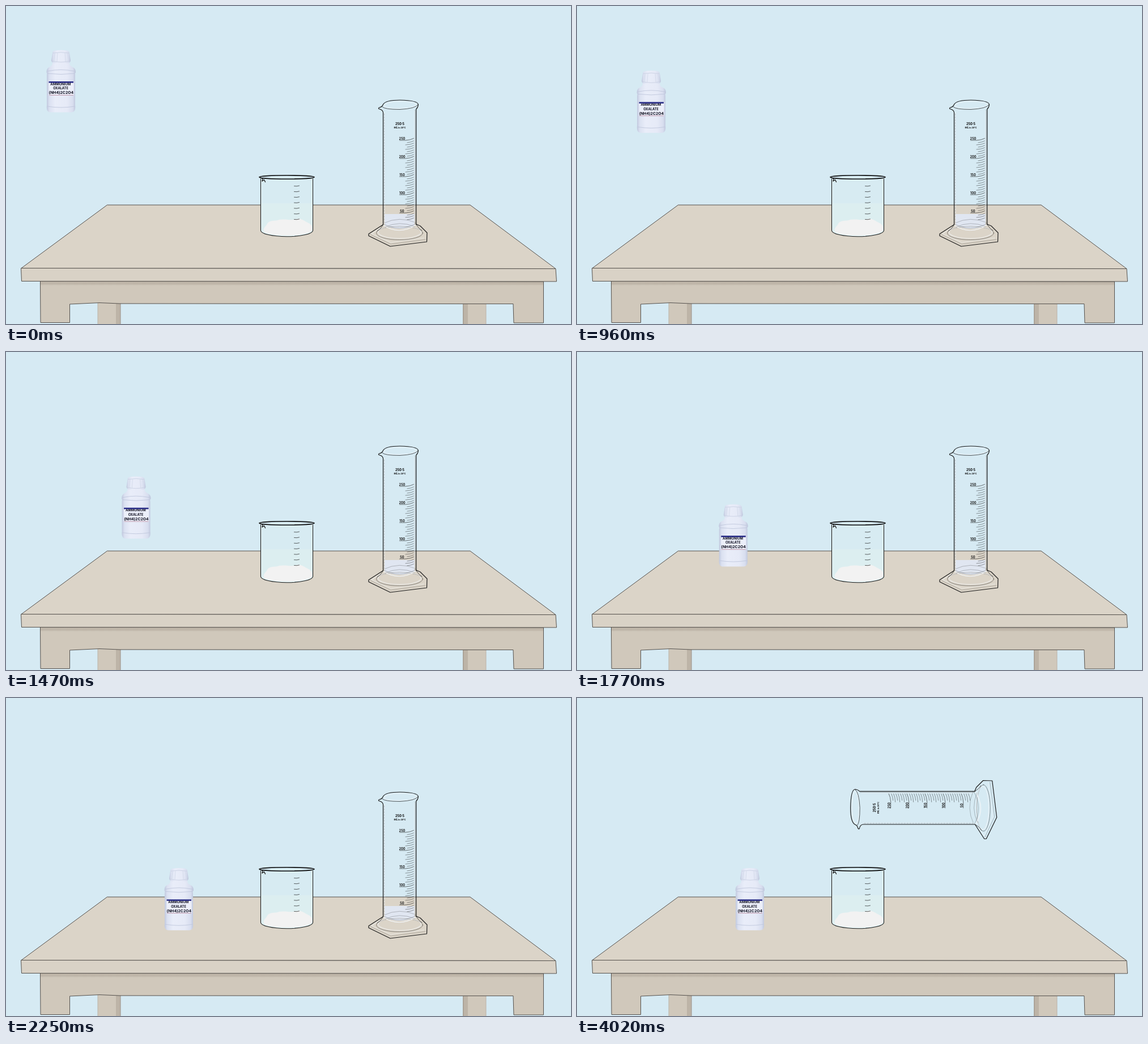
Recreate the animation shown at these times as an HTML page. Size 997 px wide and 561 px high, loop 6330 ms.

```html
<!DOCTYPE html>
<html lang="en">
<head>
<meta charset="utf-8">
<title>Beaker and cylinder</title>
<style>
  html, body { margin: 0; width: 100%; height: 100%; overflow: hidden; background: #d6eaf3; }
  svg { display: block; width: 100%; height: 100%; }
  text { font-family: Inter, "Open Sans", sans-serif; font-weight: 700; text-anchor: middle; }
  .ink { fill: none; stroke: #1c1c1c; stroke-linecap: round; stroke-linejoin: round; }
  .edge { stroke: #55514d; stroke-width: 1; stroke-linejoin: round; }
  .glow { fill: none; stroke: #f4f7fa; stroke-width: 1.2; }
</style>
</head>
<body>
<svg viewBox="0 0 997 561" xmlns="http://www.w3.org/2000/svg">
  <defs>
    <linearGradient id="plastic">
      <stop offset="0" stop-color="#bfc7dd"/>
      <stop offset=".1" stop-color="#dbe1f1"/>
      <stop offset=".3" stop-color="#e9edf9"/>
      <stop offset=".7" stop-color="#e6eaf7"/>
      <stop offset=".9" stop-color="#d8deef"/>
      <stop offset="1" stop-color="#bcc4da"/>
    </linearGradient>
    <linearGradient id="apron" x2="0" y2="1">
      <stop offset="0" stop-color="#b9b0a3"/>
      <stop offset=".08" stop-color="#c1b8ab"/>
      <stop offset=".11" stop-color="#d0c8bb"/>
    </linearGradient>

    <g id="cylinder">
      <!-- base -->
      <path d="M665 386L640 402V405.500L678 424L742.500 416L743 400L731 388L724 385" class="ink" stroke-width="1.2"/>
      <path d="M643 403L679 420L740 412" class="ink" stroke-width=".5" opacity=".5"/>
      <path d="M661 391L645 402L679 417L738 409" class="glow" opacity=".5"/>
      <ellipse cx="694.500" cy="400.500" rx="41" ry="12" class="ink" stroke-width=".7" opacity=".65"/>
      <ellipse cx="694.500" cy="399" rx="38" ry="11" class="glow" opacity=".7"/>
      <path d="M665 386Q662 393 655 397M724 385Q728 393 734 396" class="ink" stroke-width=".7"/>
      <path d="M666 387Q694 405 724 386" class="glow"/>
      <path d="M667 383Q694 370 723 382M669 390Q694 378 721 389M667 385Q694 399 723 384" class="ink" stroke-width=".5" opacity=".5"/>
      <!-- walls and rim -->
      <path d="M668 188V384M721 185V382" class="glow" opacity=".6"/>
      <path d="M667.500 190V382" class="ink" stroke-width=".5" stroke-dasharray="3 2" opacity=".5"/>
      <path d="M665.500 386V188Q665 183 658 181.500Q656.500 180 659 179Q664 178 665.500 173.500Q670 166 695 166Q727 166.500 727.500 174Q727 179 723.800 182V386" class="ink" stroke-width="1.2"/>
      <path d="M664 178Q668 182.500 695 182.500Q723 181 727 174" class="ink" stroke-width=".7"/>
      <path d="M667 176Q670 169 695 168.500Q722 169 724 174Q720 180 695 180.500Q670 181 667 176Z" class="glow" opacity=".6"/>
      <path d="M722 183V384" class="ink" stroke-width=".5" opacity=".6"/>
      <text x="695" y="210" font-size="5.600">250:5</text>
      <text x="695" y="216.300" font-size="4.500">mL <tspan font-size="3.600">In 20°C</tspan></text>
      <g id="scale" fill="#1c1c1c"></g>
    </g>
  </defs>

  <rect width="997" height="561" fill="#d6eaf3"/>

  <!-- table -->
  <g>
    <path d="M162 524H202V561H162ZM806 524H847V561H806Z" fill="#d0c8bb"/>
    <path d="M194 524H202V561H194ZM806 524H815V561H806Z" fill="#bdb4a7"/>
    <path d="M162 524V561M847 524V561" stroke="#bbb3a8"/>
    <path d="M202 524V561M807 524V561" stroke="#99928a"/>
    <path d="M60.500 485L948.500 486V559H896L895 525.500L200 525L165 523.500L112.500 526V558.500H61Z" fill="url(#apron)" class="edge"/>
    <path d="M178.500 351H819L970 463.500L27 462.500Z" fill="#dbd4c8" class="edge"/>
    <path d="M26.500 462.500L970 463.500L971.500 486L27.500 485.500Z" fill="#d9d2c6" class="edge"/>
  </g>

  <!-- beaker -->
  <g>
    <path d="M449.500 304H541.500V396A46 10.700 0 0 1 449.500 396Z" fill="#d7ebf2"/>
    <path d="M449.500 348H541.500V396A46 10.700 0 0 1 449.500 396Z" fill="#dceef0"/>
    <path d="M455 398C453 391 459 389 461 384C465 377 475 380 482 377C494 375 503 379 512 376C522 374 527 380 534 383C540 386 541 391 540.500 396C535 403 516 405.500 495 405.500C474 405.500 460 403 455 398Z" fill="#f2f2f2"/>
    <path d="M450.700 306V395A44.800 10.400 0 0 0 540.300 395V306" fill="none" stroke="#e6f6f7" stroke-width="1.200"/>
    <path d="M449.500 305V396A46 10.700 0 0 0 541.500 396V305" class="ink" stroke-width="1.100"/>
    <ellipse cx="495.500" cy="302" rx="48.500" ry="3.200" class="ink" stroke-width="1.600" style="stroke:#080808"/>
    <path d="M447 301.500L453 305L452 309L455.500 306.500L457.500 310.500" class="ink" stroke-width="1.300"/>
    <g id="marks"></g>
  </g>

  <g id="standing">
    <path d="M668 367H721V387Q695 399 668 387Z" fill="#e2e8f6" opacity=".9"/>
    <use href="#cylinder"/>
  </g>
  <use id="tipped" href="#cylinder" transform="matrix(0 -1 1 0 316.700 888.500)"/>

  <g id="bottle">
    <path d="M82 99H112Q111 105 118 108Q123 110 123 117Q121 119 122 122V175Q123.500 187.500 115 187.500H79Q70.500 187.500 72 175V122Q73 119 71.500 117Q71.500 110 76 108Q83 105 82 99Z" fill="url(#plastic)"/>
    <path d="M82 83Q82 79 87 78.500Q97 77 107 78.500Q112 79 112 83L114 96Q114 100 109 101H85Q80 100 80 96Z" fill="url(#plastic)"/>
    <path d="M83 83Q97 80.500 111 83M81 97Q97 101 113 97" fill="none" stroke="#c6cde0" stroke-width=".8"/>
    <path d="M86 84L84.500 97M91 83L90 98M104 83L105 98M109 84L111 97" stroke="#d0d7e8" stroke-width=".8"/>
    <path d="M73 115Q97 110 121 115M73 119Q97 122 121 119M73 177Q97 181 121 177" fill="none" stroke="#c0c8dd" stroke-width=".9"/>
    <rect x="75.500" y="133" width="44" height="25" fill="#eceffa"/>
    <path d="M76 157.300H119" stroke="#b68a9f" stroke-width=".9"/>
    <g fill="#101020">
      <text x="96.300" y="139.700" font-size="5.900">AMMONIUM</text>
      <text x="96.500" y="147.300" font-size="5.700">OXALATE</text>
      <text x="97.300" y="155.400" font-size="6.800">(NH4)2C2O4</text>
    </g>
    <rect x="75.500" y="133" width="43.500" height="2.600" fill="#2a2e88"/>
  </g>
</svg>
<script>
const LOOP = 6330, STEP = 30;
const byId = id => document.getElementById(id);
const clamp = v => Math.min(1, Math.max(0, v));

const line = (d, width, opacity = 1) =>
  `<path d="${d}" class="ink" stroke-width="${width}" opacity="${opacity}"/>`;

function drawScale() {
  let out = '';
  for (let i = 0; i < 5; i++) {
    const y = 236 + i * 32;
    out += `<text x="699" y="${y}" font-size="5.6">${250 - i * 50}</text>`;
    out += line(`M694.500 ${y + 1}H705Q714 ${y + 0.5} 719.500 ${y - 2.5}`, 0.6);
  }
  for (let i = 1; i < 36; i++) {
    if (i % 8 === 0) continue;
    const y = 237 + i * 4, x = i % 2 ? 708 : 705;
    out += line(`M${x} ${y}Q714 ${y - 0.3} 719.500 ${y - 3}`, 0.6, 0.75);
  }
  byId('scale').innerHTML = out;
}

function drawMarks() {
  let out = '';
  for (let i = 0; i < 7; i++) {
    const y = 317.7 + i * 9.8;
    out += line(`M508.500 ${y}Q513 ${y + 0.8} 517.500 ${y - 0.6}`, 0.8, 0.85);
  }
  byId('marks').innerHTML = out;
}

// Constant acceleration up to the turn, then constant braking.
function glide(t) {
  const start = 465, turn = 1297, end = 2265;
  const share = (turn - start) / (end - start);
  if (t <= start) return 0;
  if (t >= 2250) return 1;
  return t < turn
    ? share * ((t - start) / (turn - start)) ** 2
    : 1 - (1 - share) * ((end - t) / (end - turn)) ** 2;
}

function render(t) {
  const p = glide(t);
  byId('bottle').setAttribute('transform', `translate(${208 * p} ${222.3 * p})`);
  byId('standing').setAttribute('opacity', 1 - clamp((t - 2760) / 360));
  byId('tipped').setAttribute('opacity', clamp((t - 3660) / 360));
}

drawScale();
drawMarks();
const begin = performance.now();
function tick() {
  const t = (performance.now() - begin) % LOOP;
  render(Math.floor(t / STEP) * STEP);
  requestAnimationFrame(tick);
}
tick();
</script>
</body>
</html>
```
